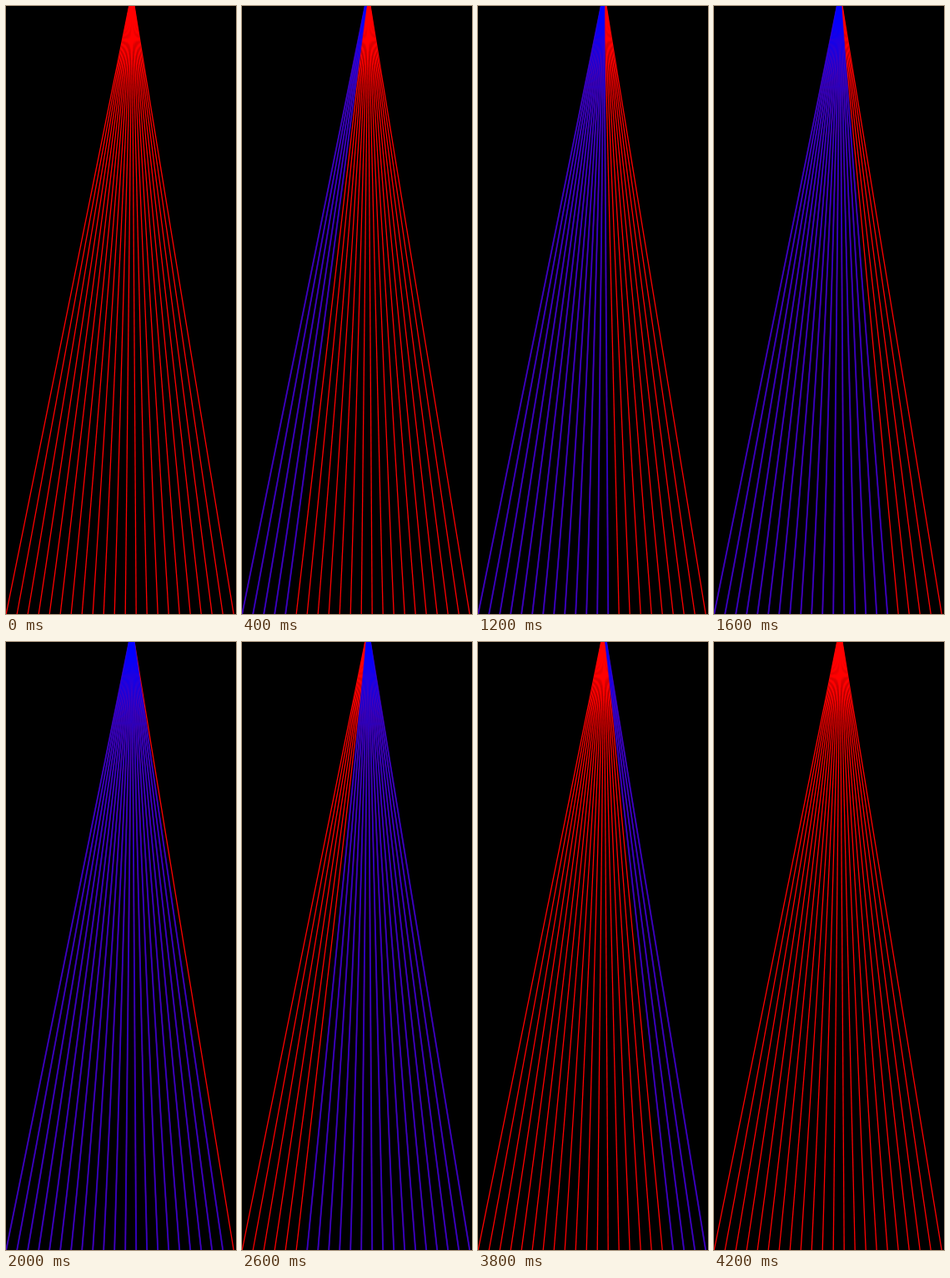
Write an HTML page with a canvas that moves like this. It is 276 px wide and 727 px high and loops after 4.7 s.

```html
<!DOCTYPE html>
<html>
<head>
<meta charset="utf-8">
<style>
  html, body { margin: 0; height: 100%; overflow: hidden; background: #000; }
  canvas { display: block; }
</style>
</head>
<body>
<canvas width="276" height="727"></canvas>
<script>
const ctx = document.querySelector('canvas').getContext('2d');
const WIDTH = 276, HEIGHT = 727;
const RAYS = 22, STEP = 100, LOOP = 4700, LAST_STEP = 42;
const APEX = { x: 151.2, y: -17 };
const FIRST_X = 0.2, GAP = 13;

function drawRay(i, color, width) {
  ctx.strokeStyle = color;
  ctx.lineWidth = width;
  ctx.beginPath();
  ctx.moveTo(APEX.x, APEX.y);
  ctx.lineTo(FIRST_X + i * GAP, HEIGHT);
  ctx.stroke();
}

function draw(time) {
  const step = Math.min(Math.floor((time % LOOP) / STEP), LAST_STEP);
  ctx.fillStyle = '#000';
  ctx.fillRect(0, 0, WIDTH, HEIGHT);
  for (let i = 0; i < RAYS; i++) drawRay(i, '#f00', 1.3);

  // Blue sweeps in from the left, then red follows it across.
  if (step > 0) {
    for (let i = Math.max(0, step - RAYS + 2); i <= Math.min(step, RAYS - 1); i++) {
      drawRay(i, 'rgba(0, 0, 255, 0.72)', 2);
    }
  }
}

function tick() {
  draw(performance.now());
  requestAnimationFrame(tick);
}
tick();
</script>
</body>
</html>
```
